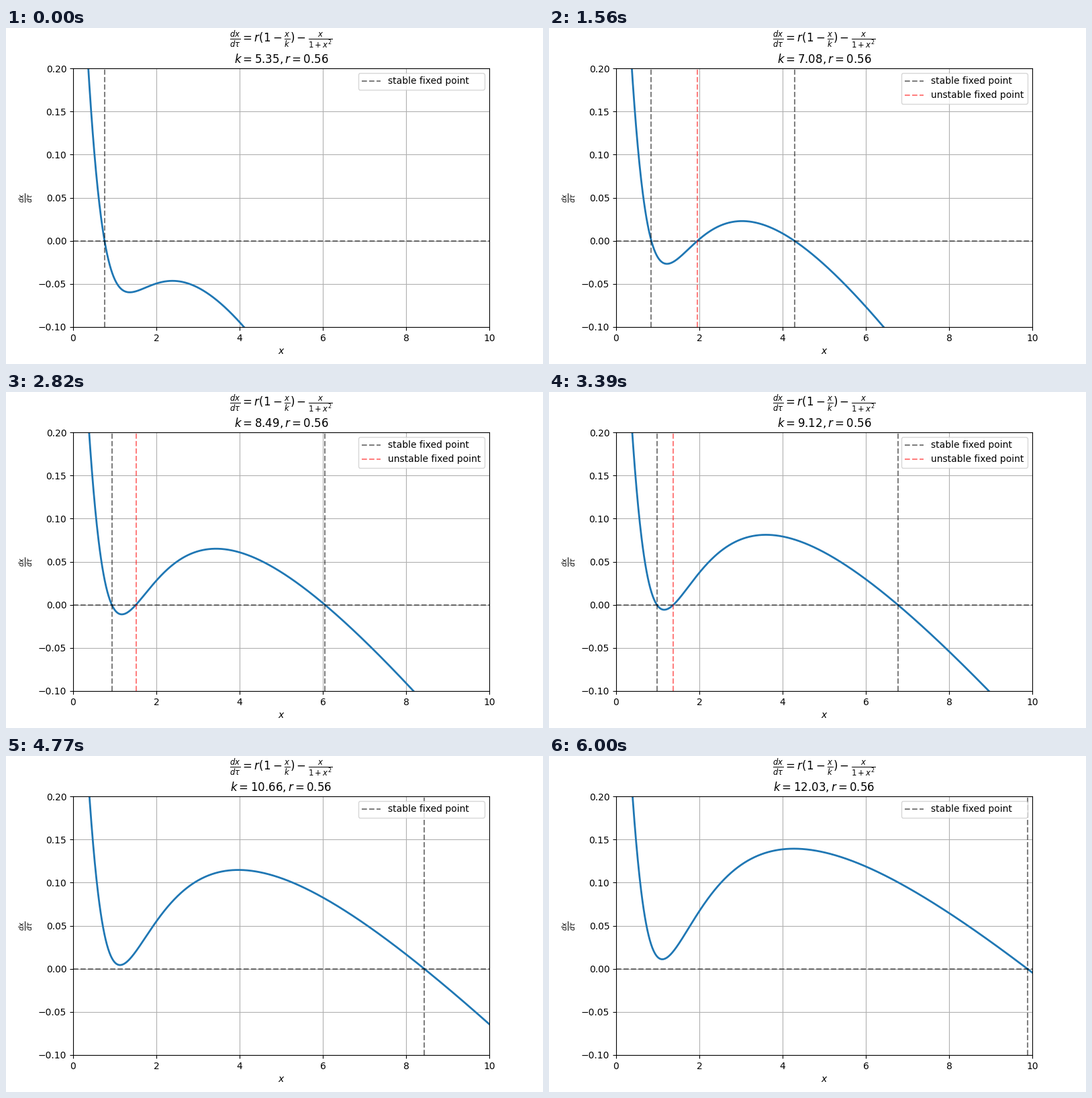
Recreate the animation shown at these times as a matplotlib script. Size 800x500 px, loop 6030 ms.

```python
import numpy as np
import matplotlib.pyplot as plt
from matplotlib.animation import FuncAnimation

FRAMES = 201
INTERVAL = 30
R = 0.56
K_START, K_END = 5.3456, 12.0335

EQUATION = r"$\frac{dx}{d\tau} = r(1-\frac{x}{k})-\frac{x}{1+x^2}$"


def rate(x, k):
    return R * (1 - x / k) - x / (1 + x**2)


def fixed_points(k):
    """Real roots of the rate, in ascending order."""
    roots = np.roots([-R / k, R, -(R / k + 1), R])
    return np.sort(roots[np.abs(roots.imag) < 1e-7].real)


fig, ax = plt.subplots(figsize=(8, 5), dpi=100)
ax.set(xlim=(0, 10), ylim=(-0.1, 0.2), xlabel="$x$", ylabel=r"$\frac{dx}{d\tau}$")
ax.grid(True)

x = np.linspace(0, 10, 1000)
curve, = ax.plot(x, rate(x, K_START), lw=2)

dashed = dict(ls="--", lw=1.5, alpha=0.5)
ax.axhline(0, color="black", **dashed)
low, middle, high = [ax.axvline(0, color=c, **dashed) for c in ("black", "red", "black")]

# Trailing spaces keep both legends equally wide.
labels = ["stable fixed point    ", "unstable fixed point"]
single = ax.legend([low], labels[:1], loc="upper right")
ax.add_artist(single)
double = ax.legend([low, middle], labels, loc="upper right")


def update(i):
    k = K_START + (K_END - K_START) * i / (FRAMES - 1)
    curve.set_ydata(rate(x, k))

    points = fixed_points(k)
    bistable = len(points) == 3
    low.set_xdata([points[0]] * 2)
    if bistable:
        middle.set_xdata([points[1]] * 2)
        high.set_xdata([points[2]] * 2)
    for artist in (middle, high, double):
        artist.set_visible(bistable)
    single.set_visible(not bistable)

    ax.set_title(f"{EQUATION}\n$k = {k:.2f}, r = {R:.2f}$")
    return []


anim = FuncAnimation(fig, update, frames=FRAMES, interval=INTERVAL,
                     repeat=True, repeat_delay=0, cache_frame_data=False)
plt.show()
```
